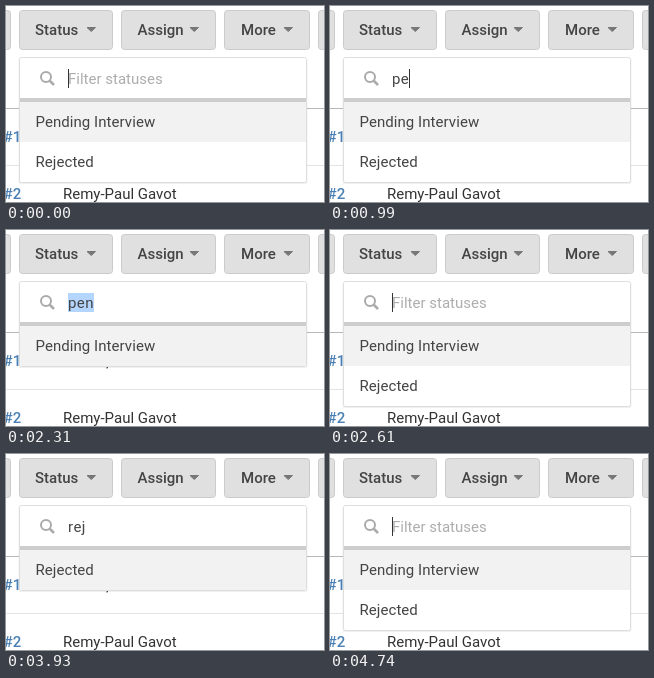
Animation, 318 px wide and 196 px high, one loop 5010 ms. Source, as an HTML page:

```html
<!DOCTYPE html>
<html lang="en">
<head>
<meta charset="utf-8">
<title>Status filter</title>
<style>
  html, body { margin: 0; width: 318px; height: 196px; overflow: hidden; background: #fff; }
  svg { display: block; }
  text { font: 15px Roboto, "Open Sans", sans-serif; fill: #444; white-space: pre; }
  .button rect { fill: #e0e0e0; stroke: #cbcbcb; }
  .button text { font-weight: 500; fill: #444; }
  .button path { fill: #777; stroke: #777; stroke-linejoin: round; }
  .id { font-weight: 500; fill: #4a80b4; }
  .name { fill: #333; }
  .item { letter-spacing: .06px; }
  #hint { fill: #adadad; }
  #typed { letter-spacing: .45px; }
</style>
</head>
<body>
<svg width="318" height="196" viewBox="0 0 318 196">
  <g id="buttons"></g>

  <path d="M0 102.5H318" stroke="#b8b8b8"/>
  <path d="M0 159.5H318" stroke="#e4e4e4"/>
  <text class="id" x="-2.5" y="136">#1</text>
  <text class="name" x="100" y="137">,</text>
  <text class="id" x="-2.5" y="193">#2</text>
  <text class="name" x="57" y="193">Remy-Paul Gavot</text>

  <rect id="shadow" x="12.5" y="52" width="289" rx="2" fill="#000" opacity=".06"/>
  <rect id="panel" x="13.5" y="51.5" width="287" rx="2" fill="#fff" stroke="#dedede"/>
  <rect x="14" y="92" width="286" height="4" fill="#cdcdcd"/>
  <rect x="14" y="96" width="286" height="40" fill="#f2f2f2"/>
  <g fill="none" stroke="#aaa" stroke-width="2">
    <circle cx="40" cy="71" r="5"/>
    <path d="M43.5 74.5L48 79" stroke-width="2.5"/>
  </g>
  <rect id="selection" x="62" y="63" height="19" fill="#b4d5fe"/>
  <text id="hint" x="62" y="78">Filter statuses</text>
  <text id="typed" x="62" y="78"></text>
  <rect id="caret" y="63" width="1" height="19" fill="#333"/>
  <text id="first" class="item" x="29.5" y="121"></text>
  <text id="second" class="item" x="29.5" y="161">Rejected</text>
</svg>
<script>
const LOOP = 5010;
const $ = id => document.getElementById(id);

// x, width, label, label x, arrow x
const buttons = [
  [-60, 65], [13, 94, "Status", 29, 80], [115, 95, "Assign", 131.5, 183],
  [218, 86, "More", 235, 277], [312, 60]
];
$("buttons").innerHTML = buttons.map(([x, w, label, tx, ax]) =>
  `<g class="button"><rect x="${x + .5}" y="4.5" width="${w - 1}" height="39" rx="3"/>` +
  (label ? `<text x="${tx}" y="29">${label}</text><path d="M${ax + 1} 21.5h8.5l-4.25 4z"/>` : "") +
  "</g>").join("");

// Each track holds [start time, value] steps.
const typing = [[0, ""], [840, "p"], [990, "pe"], [1200, "pen"], [2610, ""],
  [3270, "r"], [3360, "re"], [3480, "rej"], [4740, ""]];
const listing = [[0, ""], [1500, "Pending Interview"], [2610, ""], [3480, "Rejected"], [4740, ""]];
const cursor = [[0, "on"], [240, "off"], [690, "on"], [1650, "off"], [2100, "on"],
  [2310, "select"], [2610, "on"], [3060, "off"], [3270, "on"], [3930, "off"],
  [4260, "select"], [4740, "on"]];

const at = (track, t) => track.findLast(([start]) => start <= t)[1];
const show = (id, on) => $(id).setAttribute("visibility", on ? "visible" : "hidden");

function draw(now) {
  const t = now % LOOP;
  const text = at(typing, t), match = at(listing, t), mode = at(cursor, t);

  $("typed").textContent = text;
  const width = text ? Math.floor($("typed").getComputedTextLength()) : 0;
  $("caret").setAttribute("x", 62 + width);
  $("selection").setAttribute("width", width);
  show("hint", !text);
  show("caret", mode === "on");
  show("selection", mode === "select");

  const bottom = match ? 136 : 176;
  $("panel").setAttribute("height", bottom - 51);
  $("shadow").setAttribute("height", bottom - 50);
  $("first").textContent = match || "Pending Interview";
  show("second", !match);
  requestAnimationFrame(draw);
}
draw(performance.now());
</script>
</body>
</html>
```
